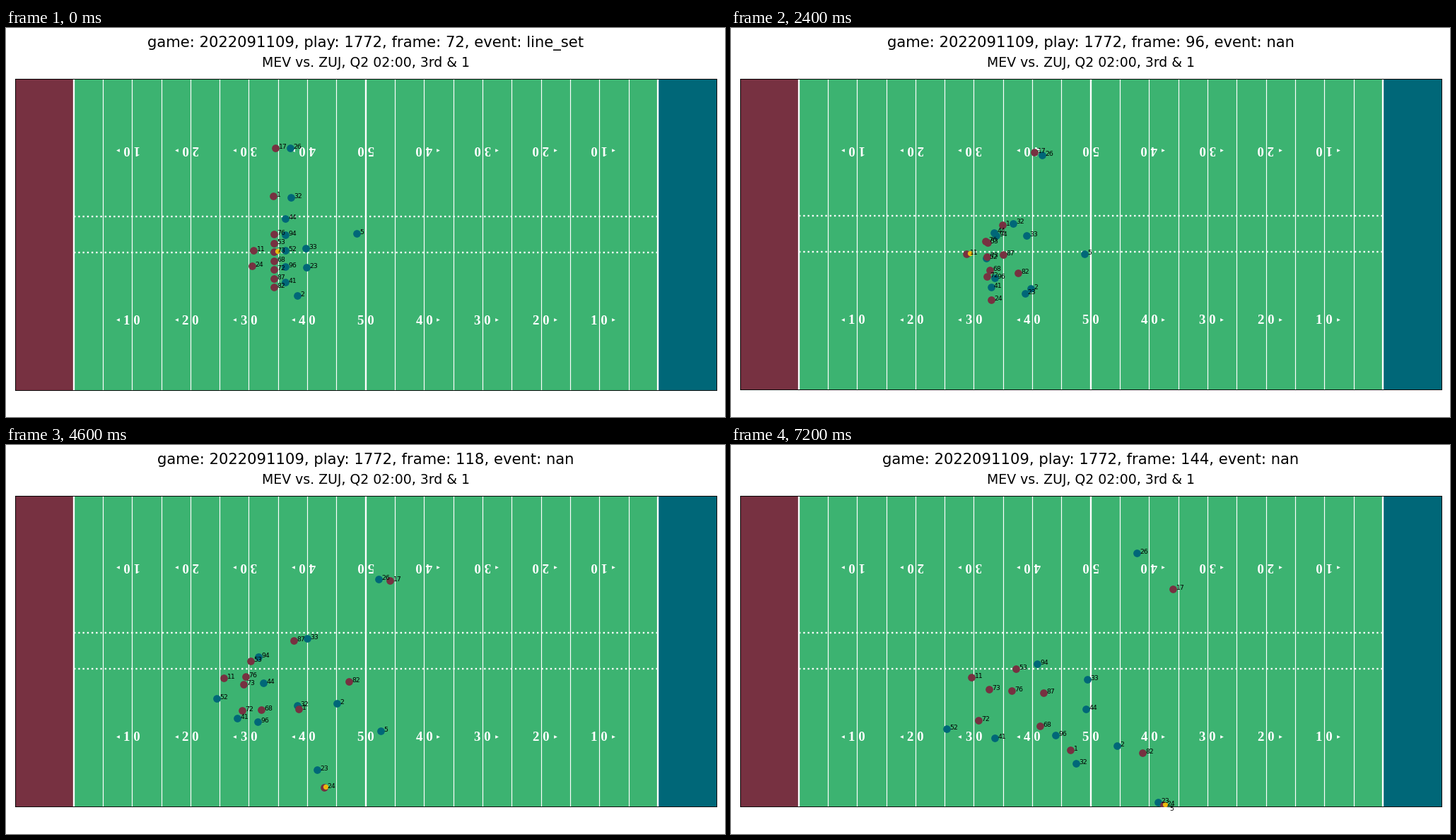
Recreate the animation shown at these times as a matplotlib script. Size 1017 by 551 pixels, loop 7.3 s.

```python
import matplotlib.pyplot as plt
import numpy as np
from matplotlib.animation import FuncAnimation
from matplotlib.patches import Rectangle

W, H, DPI = 1017, 551, 64
UNIT = 84.75 / DPI  # the design is laid out in points at 84.75 dpi
FRAMES, FIRST = 73, 72
LEFT, RIGHT, TOP, BOTTOM = 12.9, 1004.6, 71.8, 512.2
YARD = (RIGHT - LEFT) / 120
CENTER = (LEFT + RIGHT) / 2
HOME, AWAY, GRASS, BALL = "#773141", "#006778", "#3CB371", "#EBB80E"
SNAP, IN_HAND, RELEASE, CATCH, TURN, END = 8, 13, 31.5, 41, 46, 72
EVENTS = {72: "line_set", 79: "ball_snap", 105: "pass_forward",
          113: "pass_arrived", 115: "pass_outcome_caught",
          135: "first_contact", 140: "tackle"}


class Player:
    """Waits for the snap, then runs a smooth curve start -> turn -> finish."""

    times = np.array([SNAP, TURN, END])

    def __init__(self, number, start, turn, finish):
        self.number = str(number)
        self.points = np.array([start, turn, finish], float)
        self.speed = np.gradient(self.points, self.times, axis=0)
        self.speed[0] = 0

    def at(self, t):
        i = int(t >= TURN)
        h = self.times[i + 1] - self.times[i]
        u = max(t - self.times[i], 0) / h
        p, v = self.points[i:i + 2], self.speed[i:i + 2] * h
        return ((1 + 2 * u) * (1 - u) ** 2 * p[0] + u * (1 - u) ** 2 * v[0]
                + u * u * (3 - 2 * u) * p[1] + u * u * (u - 1) * v[1])


def line_up(x, y, gap, *runs):
    """Players in a straight column, one every gap pixels."""
    return [Player(number, (x, y + i * gap), turn, finish)
            for i, (number, turn, finish) in enumerate(runs)]


passer = Player(11, (350, 315), (308, 330), (340, 329))
catcher = Player(24, (348, 337), (450, 485), (612, 510))
home = line_up(
    379, 292, 12.5,
    (76, (339, 328), (397, 348)),
    (53, (346, 306), (403, 317)),
    (73, (336, 339), (365, 346)),
    (68, (361, 375), (437, 398)),
    (72, (334, 376), (350, 390)),
    (87, (407, 277), (442, 351)),
    (82, (485, 335), (582, 436)),
) + [
    Player(17, (381, 170), (543, 192), (625, 204)),
    Player(1, (378, 238), (414, 374), (480, 432)),
    passer, catcher,
]
center = home[2]
away = line_up(
    395, 270, 22.5,
    (44, (364, 337), (502, 374)),
    (94, (357, 300), (433, 310)),
    (52, (298, 359), (305, 402)),
    (96, (356, 392), (459, 411)),
    (41, (327, 387), (373, 415)),
) + [
    Player(26, (402, 170), (527, 190), (574, 153)),
    Player(32, (403, 240), (412, 369), (488, 451)),
    Player(33, (424, 312), (426, 274), (504, 332)),
    Player(23, (425, 339), (440, 460), (604, 506)),
    Player(2, (412, 379), (468, 366), (546, 426)),
    Player(5, (496, 291), (530, 405), (616, 517)),
]


def held(player, t):
    return player.at(t) + (5, -1)


def ball_at(t):
    """Held by center, passer and catcher in turn, straight flight between."""
    for giver, taker, leave, arrive in ((center, passer, SNAP, IN_HAND),
                                        (passer, catcher, RELEASE, CATCH)):
        if t <= leave:
            return held(giver, t)
        if t < arrive:
            u = (t - leave) / (arrive - leave)
            return (1 - u) * held(giver, leave) + u * held(taker, arrive)
    return catcher.at(t) + (2, -1)


fig = plt.figure(figsize=(W / DPI, H / DPI), dpi=DPI, facecolor="white")
ax = fig.add_axes([0, 0, 1, 1], facecolor=GRASS)
ax.set(xlim=(LEFT, RIGHT), ylim=(BOTTOM, TOP), xticks=[], yticks=[])
for spine in ax.spines.values():
    spine.set(linewidth=0.8 * UNIT, color="black")


def yard_x(yard):
    return LEFT + yard * YARD


def draw_number(yard):
    x = yard_x(yard)
    value = 50 - abs(yard - 60)
    style = dict(family="Liberation Serif", weight="bold", size=16 * UNIT,
                 color="white", ha="center", va="baseline",
                 rotation_mode="anchor", zorder=3)
    text = " ".join(str(value))
    ax.text(x, 419.3, text, **style)
    ax.text(x, 166.7, text, rotation=180, **style)
    if value < 50:
        side = -1 if yard < 60 else 1
        ax.plot([x + 20 * side] * 2, [173, 412.6], "<" if side < 0 else ">",
                color="white", ms=4 * UNIT, mew=0, zorder=3)


def draw_field():
    for start, color in ((0, HOME), (110, AWAY)):
        ax.add_patch(Rectangle((yard_x(start), TOP), 10 * YARD, BOTTOM - TOP,
                               color=color, lw=0, zorder=1))
    for yard in range(10, 111, 5):
        wide = yard in (10, 60, 110)
        ax.axvline(yard_x(yard), color="white", zorder=2,
                   lw=(2 if wide else 1) * UNIT)
    for hash_yard in (23.58, 29.75):
        y = BOTTOM - hash_yard * YARD
        ax.plot([yard_x(10), yard_x(110)], [y, y], ":", color="white",
                lw=2 * UNIT, zorder=2)
    for yard in range(20, 101, 10):
        draw_number(yard)


def dots(color, diameter, zorder):
    return ax.scatter([], [], s=(diameter * UNIT) ** 2, color=color,
                      linewidth=0, zorder=zorder)


def heading(baseline, size, text=""):
    return fig.text(CENTER / W, 1 - baseline / H, text, size=size * UNIT,
                    ha="center", va="baseline", family="DejaVu Sans")


draw_field()
away_dots, home_dots = dots(AWAY, 9.1, 4), dots(HOME, 9.1, 5)
ball_dot = dots(BALL, 6.2, 6)
labels = [ax.text(0, 0, p.number, size=8 * UNIT, family="DejaVu Sans", zorder=7)
          for p in home + away]
title = heading(27.4, 18)
heading(55.2, 16, "MEV vs. ZUJ, Q2 02:00, 3rd & 1")


def draw(t):
    frame = FIRST + t
    event = EVENTS.get(frame, "nan")
    title.set_text(f"game: 2022091109, play: 1772, frame: {frame}, event: {event}")
    # an underscore makes the title deeper and nudges the field down
    drop = 0.5 if "_" in event else 0
    ax.set_position([LEFT / W, 1 - (BOTTOM + drop) / H,
                     (RIGHT - LEFT) / W, (BOTTOM - TOP) / H])
    spots = np.array([p.at(t) for p in home + away])
    home_dots.set_offsets(spots[:len(home)])
    away_dots.set_offsets(spots[len(home):])
    ball_dot.set_offsets([ball_at(t)])
    for label, (x, y) in zip(labels, spots):
        label.set_position((x + 4.1, y + 0.8))


anim = FuncAnimation(fig, draw, frames=FRAMES, interval=100, repeat=True)
plt.show()
```
